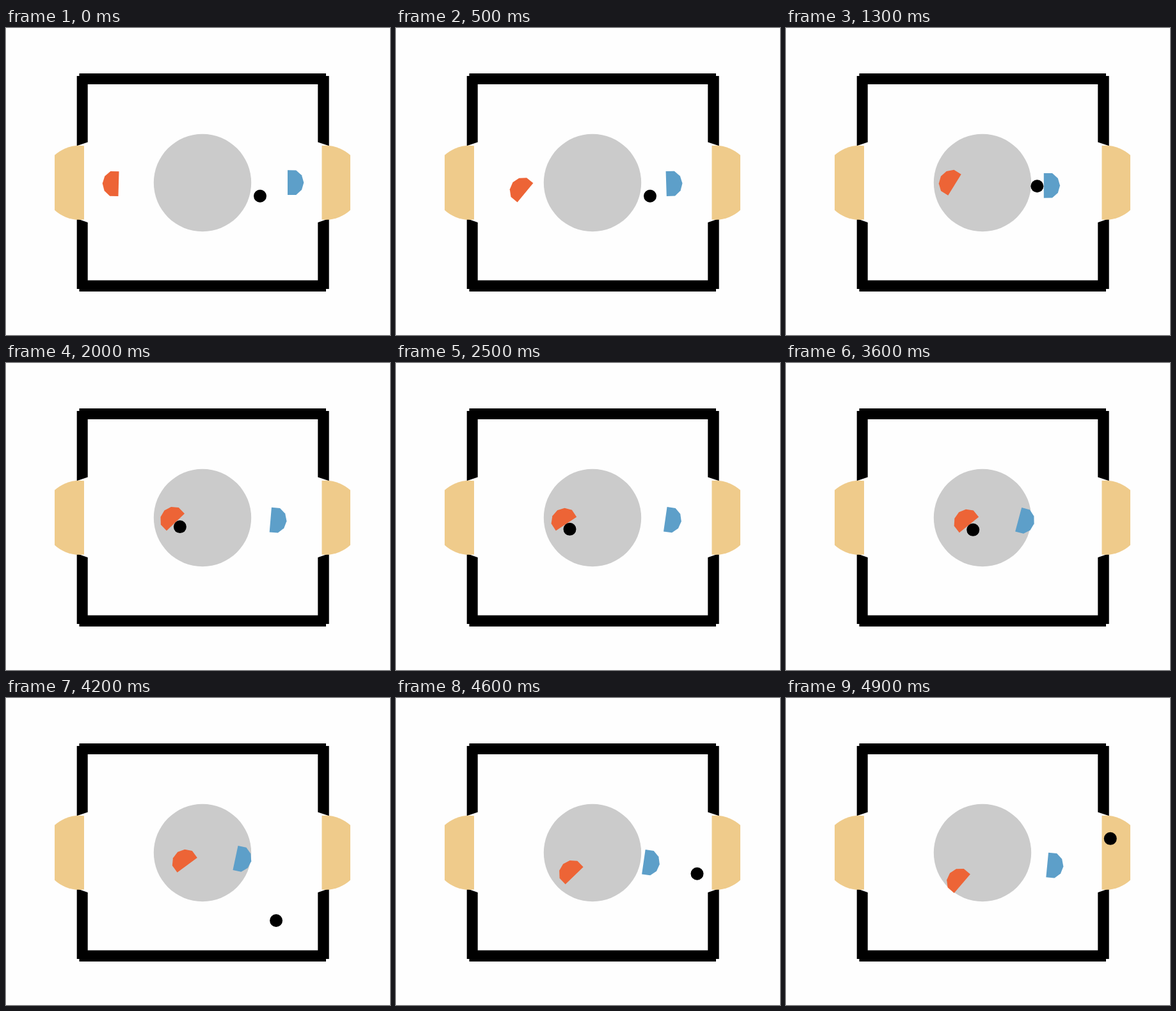
Write an HTML page with a canvas that moves like this. It is 600 px wide and 480 px high and loops after 5000 ms.

```html
<!DOCTYPE html>
<html lang="en">
<head>
<meta charset="utf-8">
<title>Air hockey</title>
<style>
html, body { margin: 0; width: 100%; height: 100%; overflow: hidden; background: #fefefe; }
canvas { display: block; }
</style>
</head>
<body>
<canvas id="stage" width="600" height="480"></canvas>
<script>
const ctx = document.getElementById('stage').getContext('2d');
const LOOP = 5000, STEP = 100;
const RAD = Math.PI / 180;
const FLOOR = 384.5, BALL = 10;

// Paddles turn and drift in straight legs between these moments (in steps).
const moments = [0, 5, 13, 25, 36, 42, 49];
const red = {
  color: '#ed6436',
  x: [176, 202, 263.5, 266, 286, 283.2, 275.3],
  y: [243.7, 257.5, 245.2, 251.5, 253, 261.2, 290.2],
  angle: [181.5, 219.6, 211.8, 236.7, 231.3, 233.6, 220.5]
};
const blue = {
  color: '#5d9fc9',
  x: [440, 422.2, 402.8, 420.8, 363.2, 358.5, 408.2],
  y: [241.7, 243.5, 246.3, 244.2, 244.7, 250, 261],
  angle: [0, -1.8, 0, 8.2, 15, 12, 5.5]
};

// Ball events (in steps): touched, hit, caught, shot.
const TOUCH = 11, HIT = 13, CATCH = 19, SHOT = 36;
const rest = { x: 397, y: 262.7 };
const hitSpot = { x: 392.4, y: 247.3 };
const shotSpeed = { x: 26.4, y: 30.9 };
const bounceSpeed = { x: 12.1, y: -18.3 };

const mix = (a, b, k) => a + (b - a) * k;
const between = (a, b, k) => ({ x: mix(a.x, b.x, k), y: mix(a.y, b.y, k) });
const travel = (p, v, t) => ({ x: p.x + v.x * t, y: p.y + v.y * t });

function pose(paddle, t) {
  const i = moments.findIndex((m, n) => t <= moments[n + 1]);
  const k = (t - moments[i]) / (moments[i + 1] - moments[i]);
  const at = values => mix(values[i], values[i + 1], k);
  return { x: at(paddle.x), y: at(paddle.y), angle: at(paddle.angle) * RAD };
}

// The ball rests against the middle of the red paddle's flat side.
function held(t) {
  const { x, y, angle } = pose(red, t);
  return { x: x - BALL * Math.cos(angle), y: y - BALL * Math.sin(angle) };
}

function ballAt(t) {
  if (t < TOUCH) return rest;
  if (t < HIT) return between(rest, hitSpot, (t - TOUCH) / (HIT - TOUCH));
  if (t < CATCH) return between(hitSpot, held(CATCH), (t - HIT) / (CATCH - HIT));
  if (t <= SHOT) return held(t);
  const from = held(SHOT);
  const fall = (FLOOR - from.y) / shotSpeed.y;
  const flown = t - SHOT;
  const p = travel(from, shotSpeed, Math.min(flown, fall));
  return travel(p, bounceSpeed, Math.max(0, flown - fall));
}

function poly(color, points) {
  ctx.fillStyle = color;
  ctx.beginPath();
  points.forEach(([x, y]) => ctx.lineTo(x, y));
  ctx.closePath();
  ctx.fill();
}

function disc(color, x, y, r) {
  ctx.fillStyle = color;
  ctx.beginPath();
  ctx.arc(x, y, r, 0, 2 * Math.PI);
  ctx.fill();
}

// A goal is a vertical slice of a disc.
function goal(left, right, cx) {
  ctx.save();
  ctx.beginPath();
  ctx.rect(left, 0, right - left, 480);
  ctx.clip();
  disc('#efcb8b', cx, 241.8, 58);
  ctx.restore();
}

function sideWall(outer, inner) {
  poly('#000', [[outer, 75], [inner, 75], [inner, 178.5], [outer, 184.3]]);
  poly('#000', [[outer, 298], [inner, 304], [inner, 408], [outer, 408]]);
}

function table() {
  ctx.fillStyle = '#fefefe';
  ctx.fillRect(0, 0, 600, 480);
  disc('#cbcbcb', 307, 242, 76.2);
  ctx.fillStyle = '#000';
  ctx.fillRect(114.5, 71, 385.5, 17);
  ctx.fillRect(114.5, 394.5, 385.5, 17.5);
  sideWall(110.7, 127.7);
  sideWall(504.7, 487.3);
  goal(76, 122, 115);
  goal(493.5, 538, 499);
}

function drawPaddle(paddle, t) {
  const { x, y, angle } = pose(paddle, t);
  const points = [[0, -19.4]];
  for (let a = -64; a <= 64; a += 32) {
    points.push([3.8 + 21.5 * Math.cos(a * RAD), 21.5 * Math.sin(a * RAD)]);
  }
  points.push([0, 19.4]);
  ctx.save();
  ctx.translate(x, y);
  ctx.rotate(angle);
  poly(paddle.color, points);
  ctx.restore();
}

function draw(t) {
  table();
  drawPaddle(red, t);
  drawPaddle(blue, t);
  const ball = ballAt(t);
  disc('#000', ball.x, ball.y, BALL);
}

const start = performance.now();
function tick() {
  const elapsed = (performance.now() - start) % LOOP;
  draw(Math.floor(elapsed / STEP));
  requestAnimationFrame(tick);
}
tick();
</script>
</body>
</html>
```
